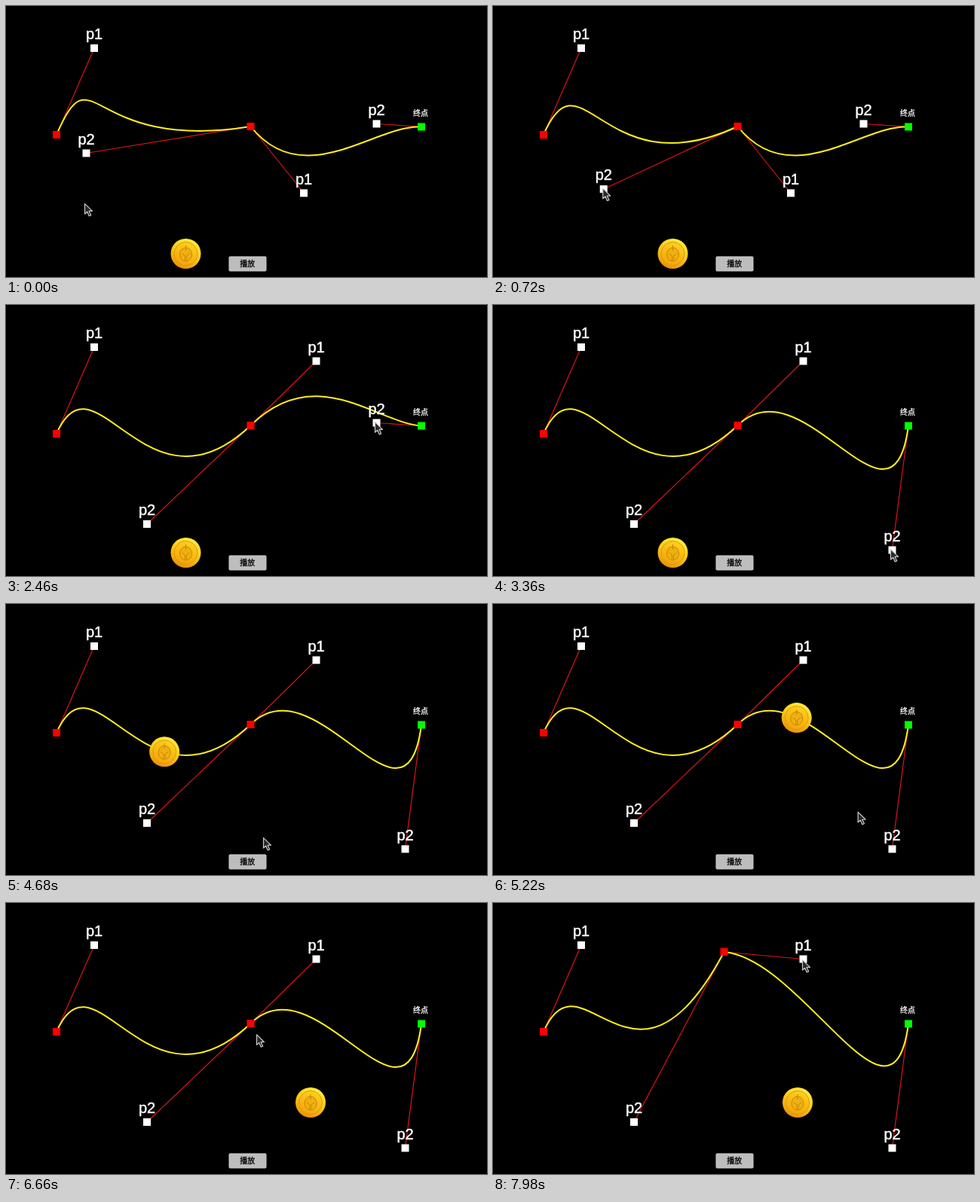
Animation, 638 px wide and 360 px high, one loop 8 s. Source, as an HTML page:

```html
<!DOCTYPE html>
<html lang="zh">
<head>
<meta charset="utf-8">
<style>
  html, body { margin: 0; width: 100%; height: 100%; overflow: hidden; background: #000; }
  svg { display: block; width: 638px; height: 360px; }
  text { text-anchor: middle; }
  .label { font: 20px "Liberation Sans", Arial, sans-serif; fill: #fff; stroke: #fff; stroke-width: .5; }
  .cjk { font: 500 10px "Noto Sans CJK SC", "Noto Sans CJK", sans-serif; stroke-width: .3; }
  .handle { stroke: #dc1414; stroke-width: 1.2; fill: none; }
  .curve { stroke: #ffee1c; stroke-width: 2; fill: none; }
</style>
</head>
<body>
<svg viewBox="0 0 638 360">
  <defs>
    <linearGradient id="rim" x1=".75" y1="0" x2=".3" y2="1">
      <stop offset="0" stop-color="#fff040"/>
      <stop offset=".5" stop-color="#fbc814"/>
      <stop offset="1" stop-color="#ec8e08"/>
    </linearGradient>
    <linearGradient id="face" x1=".3" y1="1" x2=".7" y2="0">
      <stop offset="0" stop-color="#f2a40a"/>
      <stop offset="1" stop-color="#fcd220"/>
    </linearGradient>
  </defs>
  <rect width="638" height="360"/>
  <g id="handles"></g>
  <path id="curve" class="curve"/>
  <g id="nodes"></g>
  <text class="cjk" x="550" y="145.5" fill="#fff" stroke="#fff">终点</text>
  <rect x="296" y="333" width="49" height="19" rx="1" fill="#bdbdbd" stroke="#cacaca"/>
  <text class="cjk" x="320.3" y="345.7" stroke="#000">播放</text>
  <g id="coin">
    <circle r="20" fill="url(#rim)"/>
    <circle r="15.5" fill="url(#face)" stroke="#e09a0a"/>
    <ellipse cy="1" rx="8" ry="9" fill="#f0b010" stroke="#c88408"/>
    <path d="M-5 0L-1 3V9M5 0L1 3V9M0-11V-4" fill="none" stroke="#c88408"/>
  </g>
  <path id="cursor" d="M.5.6V14.2L3.7 11.3L6.2 17L8.7 15.9L6.2 10.4H10.5Z"
        fill="#2a2a2a" stroke="#c8c8c8" stroke-width="1.2" stroke-linejoin="round"/>
</svg>
<script>
const LOOP = 8000, STEP = 60;
const COIN_START = 4080, SEGMENT = 889;
const $ = id => document.getElementById(id);

const nodes = {
  start: { at: [67, 171], fill: '#f00' },
  out1: { at: [117, 56], fill: '#fff', label: 'p1' },
  in1: { at: [106.5, 195.5], fill: '#fff', label: 'p2' },
  mid: { at: [324.5, 160], fill: '#f00' },
  out2: { at: [395, 248.5], fill: '#fff', label: 'p1' },
  in2: { at: [491.5, 156.5], fill: '#fff', label: 'p2' },
  end: { at: [551, 160.5], fill: '#0f0' }
};
const coin = { at: nodes.end.at, rest: [238.5, 329] };
const handles = [['start', 'out1'], ['mid', 'in1'], ['mid', 'out2'], ['end', 'in2']];

const pointer = { at: [104, 262], moves: [] };
const mix = (a, b, u) => a.map((v, k) => v + (b[k] - v) * u);
const easeOut = u => 1 - (1 - u) ** 3;
const easeInOut = u => u * u * (3 - 2 * u);

// Position after the last move begun by time t
function locate(item, t) {
  const move = item.moves?.findLast(m => t >= m.begin);
  if (!move) return item.at;
  const u = Math.min(1, (t - move.begin) / (move.finish - move.begin));
  return mix(move.from, move.to, move.ease(u));
}

function addMove(item, begin, finish, to, ease) {
  const from = locate(item, begin);
  (item.moves ??= []).push({ begin, finish, from, to, ease });
  return from;
}

const glide = (begin, finish, x, y) => addMove(pointer, begin, finish, [x, y], easeOut);

// The pointer keeps its grip offset while carrying an item
function drag(item, begin, finish, x, y) {
  const from = addMove(item, begin, finish, [x, y], easeInOut);
  const [px, py] = locate(pointer, begin);
  addMove(pointer, begin, finish, [px + x - from[0], py + y - from[1]], easeInOut);
}

glide(0, 300, 105, 194);
drag(nodes.in1, 480, 960, 187, 291);
glide(960, 1380, 387, 246);
drag(nodes.out2, 1500, 2100, 411.5, 74.5);
glide(2160, 2460, 489, 155);
drag(nodes.in2, 2520, 3300, 529.5, 325.5);
glide(3360, 3840, 319, 341);
glide(4080, 4680, 341, 310);
glide(4680, 5820, 508, 270);
glide(5820, 6060, 549, 163);
drag(coin, 6120, 6420, 404, 265);
glide(6420, 6900, 322, 161);
drag(nodes.mid, 7020, 7500, 306.5, 65);
glide(7500, 7860, 410, 75);

function bezier(points, u) {
  while (points.length > 1) points = points.slice(1).map((p, i) => mix(points[i], p, u));
  return points[0];
}

function coinAt(t, p) {
  const u = (t - COIN_START) / SEGMENT;
  if (u < 0) return coin.rest;
  if (u < 1) return bezier([p.start, p.out1, p.in1, p.mid], u);
  if (u < 2) return bezier([p.mid, p.out2, p.in2, p.end], u - 1);
  return locate(coin, t);
}

function add(parent, tag, attrs, text = '') {
  const el = document.createElementNS('http://www.w3.org/2000/svg', tag);
  for (const k in attrs) el.setAttribute(k, attrs[k]);
  el.textContent = text;
  return parent.appendChild(el);
}

const place = (el, [x, y]) => el.setAttribute('transform', `translate(${x.toFixed(2)} ${y.toFixed(2)})`);

for (const n of Object.values(nodes)) {
  n.el = add($('nodes'), 'g');
  add(n.el, 'rect', { x: -5, y: -5, width: 10, height: 10, fill: n.fill });
  if (n.label) add(n.el, 'text', { class: 'label', y: -12 }, n.label);
}
const lines = handles.map(() => add($('handles'), 'path', { class: 'handle' }));

function draw(time) {
  const t = Math.floor(time % LOOP / STEP) * STEP;
  const p = {};
  for (const [name, n] of Object.entries(nodes)) {
    p[name] = locate(n, t);
    place(n.el, p[name]);
  }
  handles.forEach(([a, b], i) => lines[i].setAttribute('d', `M${p[a]}L${p[b]}`));
  $('curve').setAttribute('d',
    `M${p.start}C${p.out1} ${p.in1} ${p.mid}C${p.out2} ${p.in2} ${p.end}`);
  place($('coin'), coinAt(t, p));
  place($('cursor'), locate(pointer, t));
}

let origin;
function tick(now) {
  origin ??= now;
  draw(now - origin);
  requestAnimationFrame(tick);
}
draw(0);
requestAnimationFrame(tick);
</script>
</body>
</html>
```
